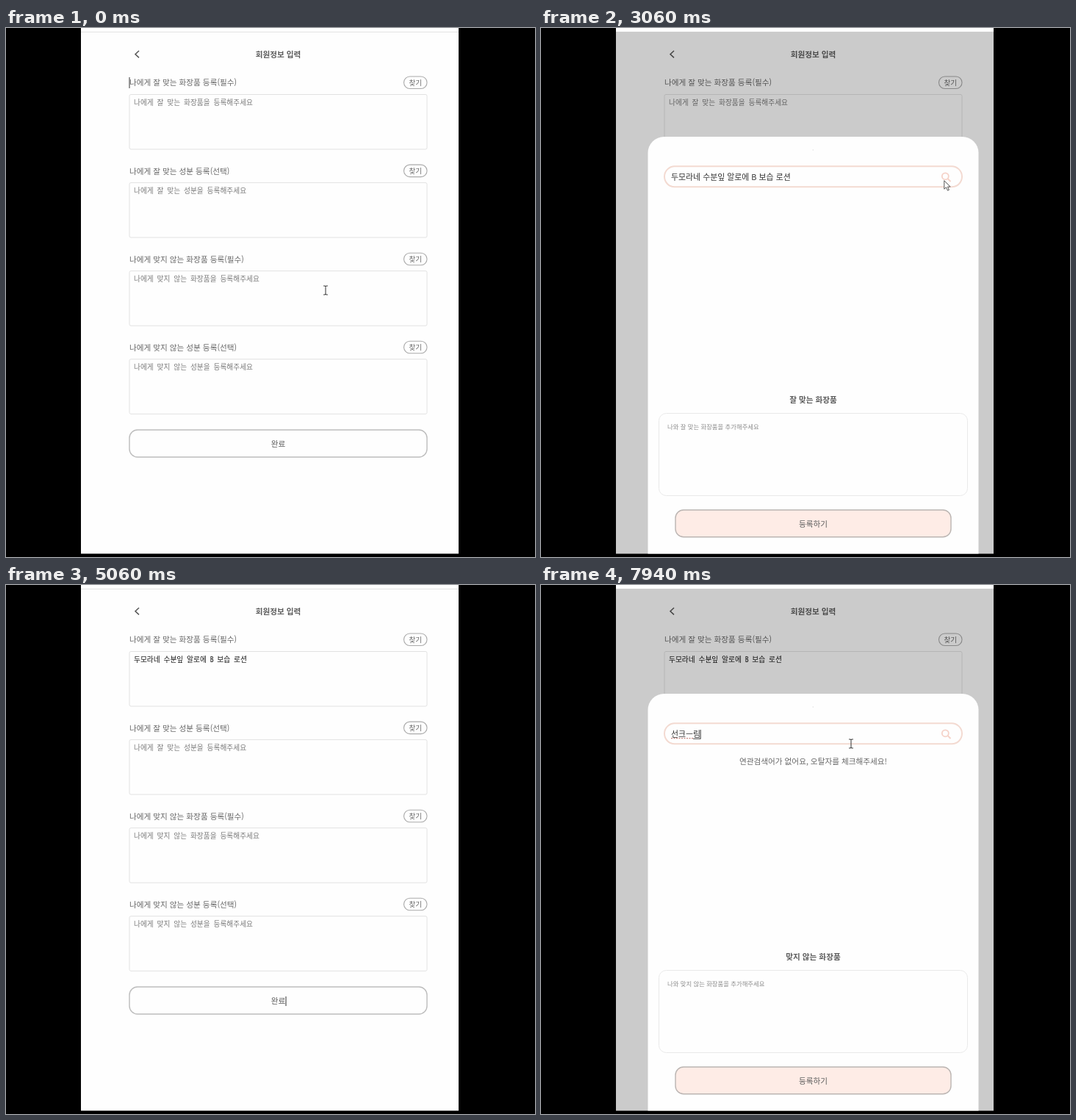
An HTML page for the animation above (8 s loop, 720 px wide and 720 px high).

```html
<!DOCTYPE html>
<html lang="ko">
<head>
<meta charset="utf-8">
<title>회원정보 입력</title>
<style>
html, body { margin: 0; width: 100%; height: 100%; overflow: hidden; background: #000; }
svg { display: block; width: 100vw; height: 100vh; }
text { font-family: 'Noto Sans CJK KR', 'Noto Sans KR', sans-serif; white-space: pre; }
.mono { font-family: 'Noto Sans Mono CJK KR', 'Noto Sans CJK KR', monospace; }
</style>
</head>
<body>
<svg id="stage" viewBox="0 0 720 720"></svg>
<script>
const LOOP = 8000, TICK = 62.5, EM = 10.64;
const BLINK = 250;       // half a caret period
const LAG = 190;         // delay from typing to results
const GAP = 120.1;       // distance between form fields
const PICKED = 2310, SEARCHED = 3250, ADDED = 3500, CHECKED = 7690;

const BRAND = '두모라네';
const PICK = BRAND + ' 수분잎 알로에 B 보습 로션';
const CATALOG = [
  ...[
    'QLTN 허브잎 젤', 'LK보호 낮크림', 'LK보호 낮보호로션', 'LK보호 빛결 낮', '수분잎 알로에 B 보습 로션',
    '라벤더 포근 탄력감 크림', '라벤더 나이트용 0.2% 주름 에멀전', '라벤더 나이트용 0.4% 주름 에멀전',
    '숲 솔잎물 촉촉하게 토너액'
  ].map(name => BRAND + ' ' + name),
  ...['수분', '진정', '보습', '산뜻', '촉촉', '가벼운', '순한', '데일리', '톤업'].map(name => name + ' 선크림')
];

const KINDS = [['잘 맞는 화장품', '필수'], ['잘 맞는 성분', '선택'], ['맞지 않는 화장품', '필수'], ['맞지 않는 성분', '선택']];
const VISITS = [
  { open: 630, close: 3750, kind: 0, word: BRAND, focus: 1060, from: 1610, to: 1890 },
  { open: 4500, close: 5060, kind: 1, word: '' },
  { open: 6130, close: LOOP, kind: 2, word: '선크ㅡ림', focus: 6690, from: 6870, to: 7440 }
];

const HOME = [435, 357];
// start, end, target x, target y
const GLIDES = [
  [70, 560, 555, 69], [810, 940, 372, 203], [940, 1060, 372, 657], [1880, 2180, 337, 363],
  [2440, 3060, 554, 203], [3250, 3440, 571, 251], [3440, 3740, 444, 667], [3880, 4000, 484, 360],
  [4130, 4310, 563, 193], [4500, 5000, 800, 190], [5400, 5810, 557, 315],
  [6250, 6440, 500, 35], [6440, 6680, 422, 216]
];

const clamp = (v, lo, hi) => Math.min(hi, Math.max(lo, v));
const during = (t, from, to) => t >= from && t < to;
const blink = (t, since) => t >= since && Math.floor((t - since) / BLINK) % 2 === 0;
const ease = p => p * p * (3 - 2 * p);
const visitAt = t => VISITS.find(v => during(t, v.open, v.close));

// y is the visual middle of the text
function text(s, x, y, { size = EM, fill = '#5c5c5c', weight = 400, mid = false, mono = false } = {}) {
  return `<text x="${x}" y="${y + size * 0.37}" font-size="${size}" fill="${fill}" font-weight="${weight}"` +
    `${mid ? ' text-anchor="middle"' : ''}${mono ? ' class="mono"' : ''}>${s}</text>`;
}
function rect(x, y, w, h, r, fill, stroke = 'none', sw = 1) {
  return `<rect x="${x}" y="${y}" width="${w}" height="${h}" rx="${r}" fill="${fill}" stroke="${stroke}" stroke-width="${sw}"/>`;
}
function path(d, stroke, sw = 1, fill = 'none', extra = '') {
  return `<path d="${d}" fill="${fill}" stroke="${stroke}" stroke-width="${sw}" ${extra}/>`;
}
const caret = (x, y, h) => rect(x, y, 1, h, 0, '#333');

function field([kind, need], i, value) {
  const y = 74.5 + i * GAP;
  return text(`나에게 ${kind} 등록(${need})`, 168, y, { weight: 500, fill: '#666' }) +
    rect(541.5, y - 8.5, 31.5, 16.5, 8.2, 'none', '#aaa', 1.1) +
    text('찾기', 557.2, y - 0.2, { size: 9.5, fill: '#666', mid: true }) +
    rect(168, y + 16, 405, 74.5, 2, 'none', '#e2e2e2') +
    text(value || `나에게 ${kind}을 등록해주세요`, 174, y + 27,
      { size: 9.7, fill: value ? '#111' : '#7a7a7a', weight: value ? 500 : 400, mono: true });
}

function form(t) {
  const closed = VISITS.map(v => v.close).filter(c => c <= t).pop();
  return path('M102 5.5H616', '#e4e4e4') +
    path('M181 31L176 35.7L181 40.4', '#555', 1.5) +
    text('회원정보 입력', 370.5, 36.3, { weight: 700, mid: true }) +
    KINDS.map((kind, i) => field(kind, i, i === 0 && t >= ADDED ? PICK : '')).join('') +
    rect(168, 547, 405, 37, 11, 'none', '#bdbdbd', 1.4) + text('완료', 370.5, 566, { mid: true }) +
    (t < 130 ? caret(167.5, 67, 15) : '') +
    (closed && blink(t, closed) ? caret(380.5, 560, 13) : '');
}

function queryAt(t, { word, from, to }) {
  if (during(t, PICKED, VISITS[0].close)) return PICK;
  if (!word || t < from) return '';
  return word.slice(0, clamp(Math.ceil((t - from) / (to - from) * word.length), 1, word.length));
}

function row(name, i) {
  const y = 240 + i * 28.55;
  return text(name, 198, y, { fill: '#666' }) + path(`M190.5 ${y + 14}H538`, '#cdcdcd', 1.1);
}

function results(t, visit) {
  const query = queryAt(t - LAG, visit);
  if (!query || during(t, PICKED, SEARCHED)) return '';
  const found = CATALOG.filter(name => name.includes(query));
  if (!found.length) return text('연관검색어가 없어요, 오탈자를 체크해주세요!', 370.5, 240, { fill: '#666', mid: true });
  if (found.length === 1) return row(found[0], 0);
  return found.map(row).join('') +
    rect(560, 232, 13, 259, 0, '#f1f1f1') + rect(561.5, 245, 10, 211, 0, '#c1c1c1') +
    path('M563.5 241h6l-3 -3.5z', 'none', 0, '#a3a3a3') + path('M563.5 482h6l-3 3.5z', 'none', 0, '#505050') +
    (during(t, 2190, PICKED) ? caret(332.5, 347, 14) : '');
}

function search(t, visit) {
  const query = queryAt(t, visit), size = 10.9, step = size * 0.92, end = 177 + query.length * step;
  const typing = during(t, visit.from, visit.to);
  const clickedAway = during(t, 2190, visit.close) && visit.kind === 0;
  const composing = query && !clickedAway;
  const active = typing || blink(t, t < visit.to ? visit.focus : visit.to);
  return rect(168, 188.3, 405, 28, 14, '#fefefe', '#f3dad1', 2) +
    '<circle cx="550.3" cy="201.8" r="4.5" fill="none" stroke="#f5d2c8" stroke-width="1.8"/>' +
    path('M553.6 205.1L557.5 209', '#f5d2c8', 2) +
    text(query || '검색어를 입력하세요.', 177, query ? 203 : 202, { size, fill: query ? '#333' : '#777' }) +
    (composing ? path(`M${end - step} 209.3H${end}`, '#444') : '') +
    (t >= CHECKED ? path('M177 208.7H208', '#b76a62', 1, 'none', 'stroke-dasharray="2 1.5"') : '') +
    (active && !clickedAway ? caret(end - 0.5, 197, 12.5) : '');
}

function modal(t) {
  const visit = visitAt(t);
  if (!visit) return '';
  const title = KINDS[visit.kind][0];
  const chosen = visit.kind === 0 && t >= ADDED;
  return rect(102, 5.5, 514, 711, 0, 'rgba(0,0,0,.2)') +
    rect(145.5, 148, 450, 600, 22, '#fefefe') +
    '<circle cx="370.3" cy="166" r=".7" fill="#ddd"/>' +
    search(t, visit) + results(t, visit) +
    text(title, 370.5, 506, { weight: 700, mid: true }) +
    rect(160.5, 524.5, 420, 112, 10, 'none', '#e9e9e9') +
    (chosen ? text(PICK, 172, 543) : text(`나와 ${title}을 추가해주세요`, 172, 543, { size: 8.37, fill: '#8c8c8c', weight: 500 })) +
    rect(183, 656, 375, 36.7, 11, '#feece6', '#bbb5b2', 1.4) +
    text('등록하기', 370.5, 675, { mid: true });
}

function overText(x, y, t) {
  const visit = visitAt(t);
  if (!visit) return during(x, 168, 573) && y < 526 && during((y - 74.5 + GAP) % GAP, 16, 90);
  const overSearch = during(x, 168, 545) && during(y, 188, 217);
  const overRows = during(x, 190, 538) && during(y, 231, 490) && results(t, visit);
  return overSearch || overRows;
}

function pointer(t) {
  const now = Math.floor(t / TICK) * TICK;
  let [x, y] = HOME;
  for (const [from, to, toX, toY] of GLIDES) {
    const p = ease(clamp((now - from) / (to - from), 0, 1));
    x += (toX - x) * p;
    y += (toY - y) * p;
  }
  const shape = overText(x, y, t)
    ? path('M-3 -6H-1L0 -5L1 -6H3M0 -5V5M-3 6H-1L0 5L1 6H3', '#444', 1.1)
    : path('M.5 .5V12L3.2 9.6L5.2 14L7.1 13.1L5.2 8.9H8.8Z', '#555', 1, '#fff');
  return `<g transform="translate(${x} ${y})">${shape}</g>`;
}

const stage = document.getElementById('stage');
let shown = '';

function draw(t) {
  const next = '<clipPath id="page"><rect x="102" width="514" height="715.5"/></clipPath>' +
    '<rect width="720" height="720"/><g clip-path="url(#page)">' +
    rect(102, 0, 514, 716, 0, '#fefefe') + form(t) + modal(t) + pointer(t) + '</g>';
  if (next !== shown) stage.innerHTML = shown = next;
}

const start = performance.now();
function tick() {
  draw((performance.now() - start) % LOOP);
  requestAnimationFrame(tick);
}
tick();
</script>
</body>
</html>
```
